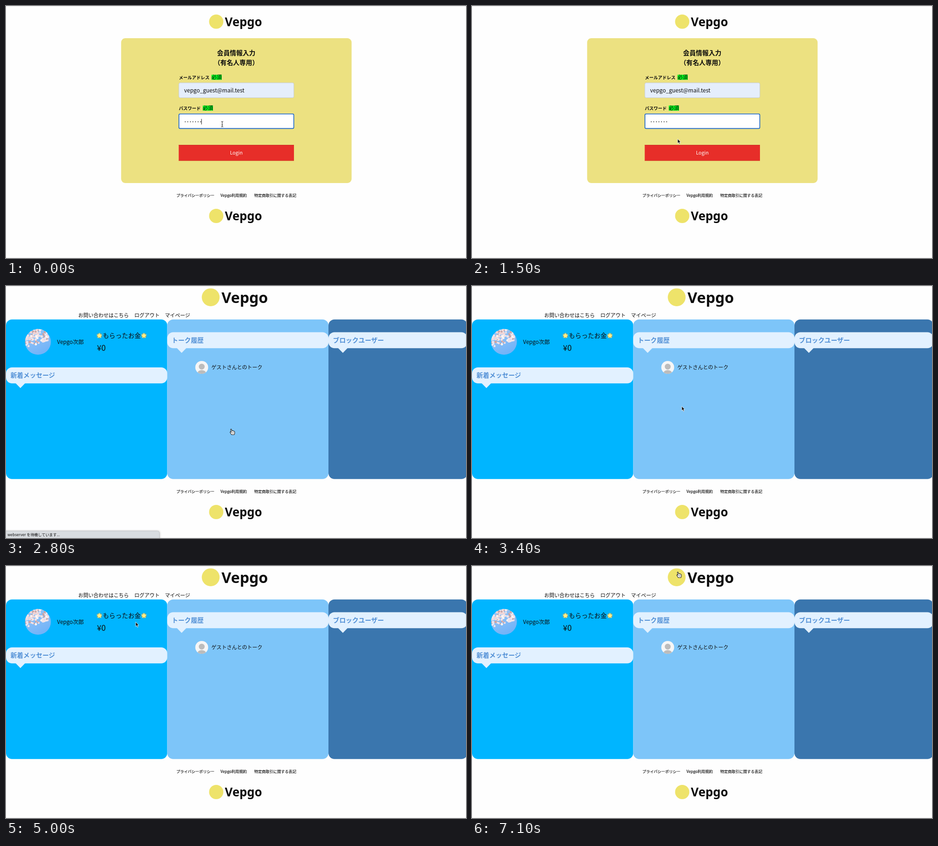
These frames come from a looping animation (1000 by 548 pixels, 7.2 s). An HTML page:

```html
<!DOCTYPE html>
<html lang="ja">
<head>
<meta charset="utf-8">
<title>Login</title>
<style>
  html, body { margin: 0; width: 100%; height: 100%; overflow: hidden; background: #fefefe; }
  svg { display: block; width: 100%; height: 100%; }
  text { font-family: "Noto Sans CJK JP", "Noto Sans CJK", sans-serif; fill: #0c0c0c; white-space: pre; }
  .bold { font-weight: 700; }
  .mid { text-anchor: middle; }
  .firm { font-weight: 500; stroke: #0c0c0c; stroke-width: 0.15px; }
  .brand { font-family: "Noto Sans", "Open Sans", sans-serif; font-weight: 600; }
  .head { font-weight: 700; fill: #5290d6; }
  .white { fill: #fff; }
</style>
</head>
<body>
<svg id="stage" viewBox="0 0 1000 548" xmlns="http://www.w3.org/2000/svg"></svg>
<script>
const LOOP = 7200, STEP = 100, SWITCH = 2800;
const BRAND = 'Vepgo';

const text = (x, y, size, str, cls = '') =>
  `<text x="${x}" y="${y}" font-size="${size}" class="${cls}">${str}</text>`;
const rect = (x, y, w, h, r, fill, extra = '') =>
  `<rect x="${x}" y="${y}" width="${w}" height="${h}" rx="${r}" fill="${fill}" ${extra}/>`;
const circle = (x, y, r, fill) => `<circle cx="${x}" cy="${y}" r="${r}" fill="${fill}"/>`;
const group = (id, body) => `<g id="${id}">${body}</g>`;

const logo = (x, y, k) =>
  circle(x, y, 15.5 * k, '#eee36a') + text(x + 18.8 * k, y + 9.6 * k, 26 * k, BRAND, 'brand');

const footer = y =>
  text(370.3, y + 3.2, 8.3, 'プライバシーポリシー', 'firm') +
  text(466.3, y + 3.2, 8.3, BRAND + '利用規約', 'firm') +
  text(539.7, y + 3.2, 8.3, '特定商取引に関する表記', 'firm') +
  logo(457, y + 44.5, 1);

const label = (y, str, markX) =>
  text(375.8, y + 3.7, 9.5, str, 'bold') +
  rect(markX, y - 5.5, 22.2, 11, 0, '#00f41c') +
  text(markX, y + 4.2, 11.1, '必須');

function loginPage() {
  const dots = Array.from({ length: 7 }, (_, i) => circle(389.6 + i * 5.6, 251.7, 0.95, '#222')).join('');
  return logo(457, 34, 1) +
    rect(250.3, 70, 501, 315, 9, '#ece181') +
    text(500.5, 106.8, 13.9, '会員情報入力', 'bold mid') +
    text(500.5, 127.6, 13.9, '（有名人専用）', 'bold mid') +
    label(155, 'メールアドレス', 446.8) +
    rect(375.8, 167, 250, 32.5, 3, '#e5eefc', 'stroke="#c6ccd4" stroke-width="1"') +
    text(387.3, 188.2, 12, 'vepgo_guest@mail.test') +
    label(222, 'パスワード', 427.8) +
    rect(375.8, 234.3, 250, 32.5, 3, '#fff', 'stroke="#c6ccd4" stroke-width="1"') +
    rect(376, 234.8, 249.6, 31.6, 2.5, 'none', 'id="focus" stroke="#1864c4" stroke-width="1.6"') +
    dots +
    rect(424.5, 245.5, 1, 12, 0, '#111', 'id="caret"') +
    rect(375.5, 302, 250.5, 34.5, 0, '#e72e29') +
    rect(375.5, 302, 250.5, 1, 0, '#c9281f') +
    rect(375.5, 335.7, 250.5, 0.8, 0, '#c9401f') +
    text(500.7, 322.8, 10.6, 'Login', 'mid white') +
    footer(412);
}

const bubble = (x, y, w, str) =>
  rect(x, y, w, 34.7, 13, '#e2f1ff') +
  `<path d="M${x + 20.5} ${y + 34}h21.5l-10.7 11z" fill="#e2f1ff"/>` +
  text(x + 9.8, y + 22.4, 13.9, str, 'head');

function starPoints(x, y, n, outer, inner) {
  const pts = Array.from({ length: n * 2 }, (_, i) => {
    const r = i % 2 ? inner : outer, a = Math.PI * (i / n - 0.5);
    return (x + r * Math.cos(a)).toFixed(2) + ',' + (y + r * Math.sin(a)).toFixed(2);
  });
  return pts.join(' ');
}

const star = (x, y) =>
  `<polygon points="${starPoints(x, y, 10, 7, 3.8)}" fill="#e9a53a"/>` +
  `<polygon points="${starPoints(x, y, 5, 6.4, 3)}" fill="#fff08a"/>`;

// Soft blossom tones over a sky gradient
function avatar() {
  let seed = 11;
  const rnd = () => (seed = seed * 16807 % 2147483647) / 2147483647;
  const tones = ['#f6e4e6', '#f0d4d6', '#fdf6f4', '#c9a3a4', '#efe2ea'];
  let body = rect(41, 93, 57, 57, 0, 'url(#sky)');
  for (let i = 0; i < 130; i++) {
    const x = rnd() * 50, y = rnd() * (42 - x * 0.35);
    body += circle((41 + x).toFixed(1), (93 + y).toFixed(1), (1.2 + rnd() * 1.8).toFixed(1), tones[i % 5]);
  }
  return `<g clip-path="url(#round)">${body}</g>`;
}

const guest =
  circle(425.5, 177, 14, '#f6f6f6') +
  `<g clip-path="url(#face)">${circle(425.5, 175.3, 6.4, '#bcbcbc')}
   <ellipse cx="425.5" cy="189.5" rx="9.2" ry="6.6" fill="#bcbcbc"/></g>`;

function homePage() {
  return logo(445, 24.5, 1.25) +
    text(157, 68.3, 11, 'お問い合わせはこちら') +
    text(279, 68.3, 11, 'ログアウト') +
    text(345.5, 68.3, 11, 'マイページ') +
    rect(0, 72.8, 350.5, 347, 13, '#00b5ff') +
    rect(350.5, 72.8, 350.5, 347, 13, '#7dc5f9') +
    rect(701, 72.8, 302, 347, 13, '#3a76ae') +
    avatar() +
    text(111, 125.7, 11.9, BRAND + '次郎') +
    star(203, 108) + text(210.3, 112.8, 13.8, 'もらったお金') + star(299.8, 108) +
    text(197.7, 141.2, 17.2, '¥0') +
    bubble(0, 177, 350.5, '新着メッセージ') +
    bubble(350.5, 100.5, 350.5, 'トーク履歴') +
    bubble(701, 100.5, 302, 'ブロックユーザー') +
    guest +
    text(446.5, 181, 11.1, 'ゲストさんとのトーク') +
    footer(447);
}

const statusBar =
  rect(-6, 533, 339.5, 22, 4, '#d9dde1', 'stroke="#bcc0c5" stroke-width="0.8" filter="url(#shade)"') +
  text(3.3, 544.2, 8.2, 'webserver を待機しています...');

// Pointer shapes are drawn around their hot spot
const pointers =
  group('beam', `<path d="M-2.2-6Q0-6 0-4.5Q0-6 2.2-6M0-4.5V4.5M-2.2 6Q0 6 0 4.5Q0 6 2.2 6M-1.2 1.5H1.2"
    fill="none" stroke="#222" stroke-width="1"/>`) +
  group('arrow', `<path d="M0 0V9.6L2.2 7.6L3.7 11.3L5.4 10.6L3.9 7H6.8Z"
    fill="#111" stroke="#fff" stroke-width="0.8" stroke-linejoin="round"/>`) +
  group('hand', `<path transform="scale(1.15)" d="M-1.5 5.5L-4.2 1.3Q-4.6-.3-3 0L-1.8 1.2L-3.2-4Q-3-5.8-1.6-4.8L-.6-1.6
    Q.6-2.6 1.3-1.4Q2.4-2.2 3-.9Q4.3-1.2 4.5.4Q4.9 3.4 3.6 5.5Z"
    fill="#fff" stroke="#111" stroke-width="0.9" stroke-linejoin="round"/>
    <path d="M0 1.2V3.8M1.6 1.2V3.8M3.2 1.2V3.8" stroke="#111" stroke-width="0.5"/>`);

const defs = `<defs>
  <linearGradient id="sky" x1="0" y1="0" x2="0.5" y2="1">
    <stop offset="0" stop-color="#9cc8f5"/><stop offset="1" stop-color="#72b3f8"/>
  </linearGradient>
  <clipPath id="round"><circle cx="69.5" cy="121.5" r="28"/></clipPath>
  <clipPath id="face"><circle cx="425.5" cy="177" r="14"/></clipPath>
  <filter id="shade"><feDropShadow dx="0" dy="0" stdDeviation="2" flood-opacity="0.3"/></filter>
</defs>`;

document.getElementById('stage').innerHTML = defs +
  rect(0, 0, 1000, 548, 0, '#fefefe') +
  group('login', loginPage()) + group('home', homePage()) +
  rect(0, 0, 1000, 1, 0, '#e9e9ea') + rect(0, 547, 1000, 1, 0, '#f4f4f4') +
  group('status', statusBar) + group('pointer', pointers);

const el = id => document.getElementById(id);
const show = (id, on) => el(id).setAttribute('visibility', on ? 'visible' : 'hidden');

// time, x, y
const path = [
  [0, 470, 257], [900, 470, 257], [1500, 447, 289], [2200, 492, 317], [3100, 492, 317],
  [4000, 353, 103], [4500, 353, 103], [5700, 164, 153], [6100, 164, 153], [7000, 450, 19], [LOOP, 450, 19]
];

function pointerAt(t) {
  const i = path.findIndex(p => p[0] > t);
  const [t0, x0, y0] = path[i - 1], [t1, x1, y1] = path[i];
  const u = (t - t0) / (t1 - t0), e = u * u * (3 - 2 * u);
  return [x0 + (x1 - x0) * e, y0 + (y1 - y0) * e];
}

function pointerKind(t, x, y) {
  if (t < SWITCH) return y < 267 ? 'beam' : y < 302 ? 'arrow' : 'hand';
  const onLogo = x > 421 && x < 570 && y < 48;
  return t <= 3100 || onLogo ? 'hand' : 'arrow';
}

function draw(time) {
  const t = Math.floor((time % LOOP) / STEP) * STEP;
  const login = t < SWITCH;
  el('login').style.display = login ? '' : 'none';
  el('home').style.display = login ? 'none' : '';
  show('focus', t < 2700);
  show('caret', (t + 100) % 1000 < 500 && t < 2700);
  show('status', t >= 2700 && t < 3200);
  const [x, y] = pointerAt(t), kind = pointerKind(t, x, y);
  el('pointer').setAttribute('transform', `translate(${x.toFixed(2)} ${y.toFixed(2)})`);
  for (const k of ['beam', 'arrow', 'hand']) show(k, k === kind);
}

const start = performance.now();
function tick() {
  draw(performance.now() - start);
  requestAnimationFrame(tick);
}
tick();
</script>
</body>
</html>
```
